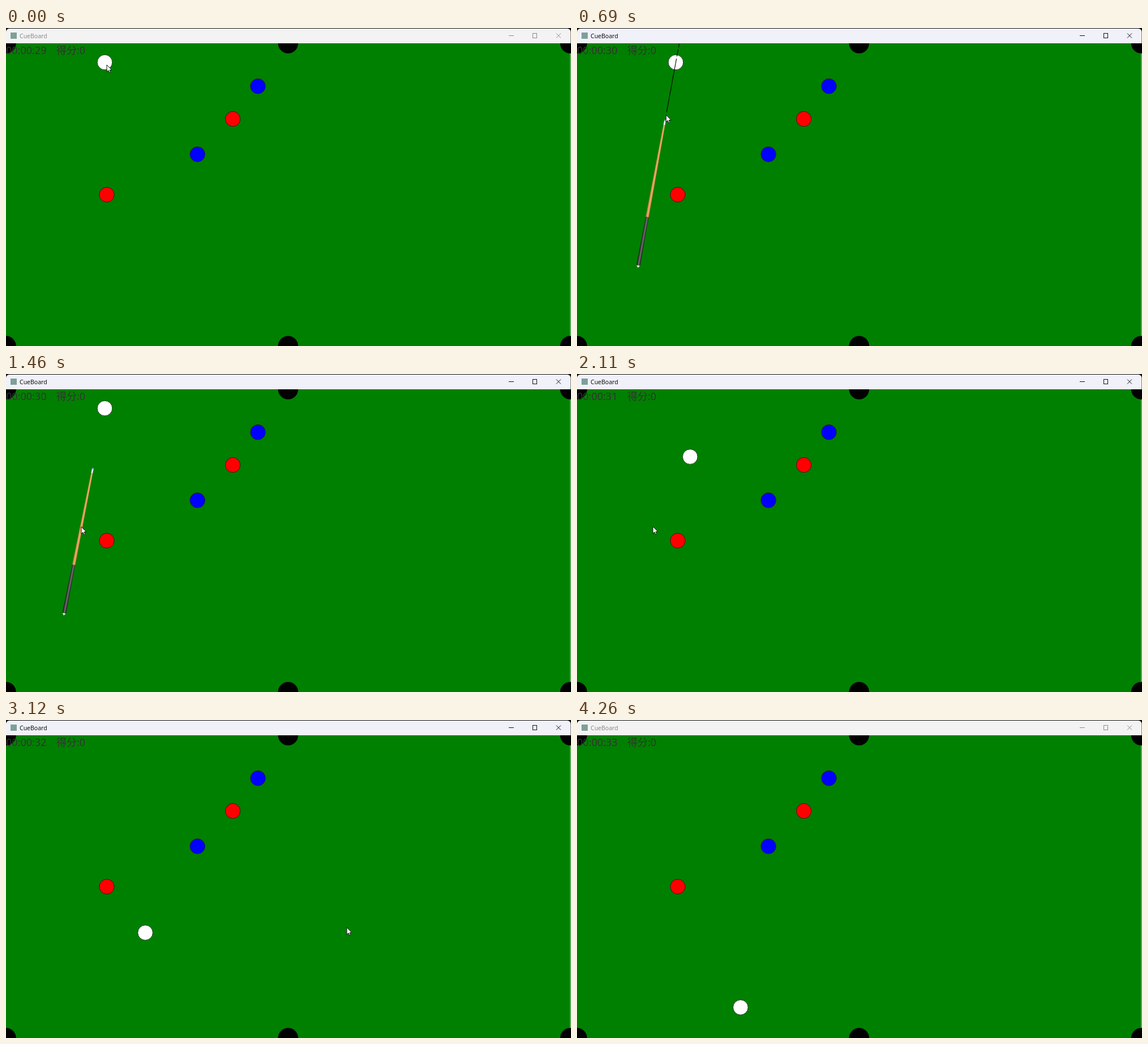
Animation of 998 by 561 pixels, one loop 4.3 s. Source, as an HTML page with a canvas:

```html
<!DOCTYPE html>
<html lang="zh">
<head>
<meta charset="utf-8">
<title>CueBoard</title>
<style>
  html, body { margin: 0; width: 100%; height: 100%; overflow: hidden; background: #008000; }
  canvas { display: block; }
</style>
</head>
<body>
<canvas id="stage" width="998" height="561"></canvas>
<script>
const ctx = document.getElementById('stage').getContext('2d');
const LOOP = 4300, HOLD = 360, STEP = 40.6;
const AIM_START = 400, RELEASE = 1320, HIT = 1585;
const CUE_SPEED = 0.84;

// Paths as [time, x, y], linear between points
const ballPath = [
  [1590, 174.5, 60.5], [1673, 178.5, 41], [2110, 200, 147], [2470, 217, 232],
  [3120, 246, 375], [3810, 273.5, 513], [4035, 280.5, 547.5],
  [4090, 282.3, 539.5], [4260, 289, 506.5], [4300, 290.5, 499]
];
const mousePath = [
  [360, 178, 65], [440, 173, 80], [690, 157, 155], [850, 145, 214],
  [1080, 133, 269.5], [1950, 133, 269.5], [2050, 134, 269], [2920, 134, 269],
  [3000, 262, 283], [3120, 600.5, 365], [3280, 890, 565]
];

function along(path, t) {
  const next = path.findIndex(p => p[0] > t);
  if (next === 0) return path[0].slice(1);
  if (next < 0) return path[path.length - 1].slice(1);
  const [t0, x0, y0] = path[next - 1], [t1, x1, y1] = path[next];
  const k = (t - t0) / (t1 - t0);
  return [x0 + (x1 - x0) * k, y0 + (y1 - y0) * k];
}

function disc(x, y, r, color, edge) {
  ctx.beginPath();
  ctx.arc(x, y, r, 0, 7);
  ctx.fillStyle = color;
  ctx.fill();
  if (edge) {
    ctx.strokeStyle = edge;
    ctx.lineWidth = 1;
    ctx.stroke();
  }
}

function shape(points, fill, stroke) {
  ctx.beginPath();
  points.forEach(([x, y]) => ctx.lineTo(x, y));
  ctx.closePath();
  ctx.fillStyle = fill;
  ctx.fill();
  if (stroke) {
    ctx.strokeStyle = stroke;
    ctx.lineWidth = 1;
    ctx.stroke();
  }
}

function text(str, x, y, size, color) {
  ctx.font = size + 'px "Noto Sans", "Noto Sans CJK SC", "Noto Sans CJK", sans-serif';
  ctx.fillStyle = color;
  ctx.fillText(str, x, y);
}

function titleBar(active) {
  ctx.fillStyle = '#111';
  ctx.fillRect(0, 0, 998, 27);
  ctx.fillStyle = active ? '#f0f1f9' : '#f3f3f3';
  ctx.beginPath();
  ctx.roundRect(0, 1, 997.5, 26, [6, 6, 0, 0]);
  ctx.fill();
  ctx.fillStyle = '#7f9f98';
  ctx.fillRect(8, 8, 11, 11);
  text('CueBoard', 24, 17.5, 10.5, active ? '#111' : '#8b8b8b');

  ctx.strokeStyle = active ? '#111' : '#8b8b8b';
  ctx.lineWidth = 1;
  ctx.strokeRect(930.5, 9.5, 7, 8);
  ctx.beginPath();
  ctx.moveTo(888, 13.5); ctx.lineTo(897, 13.5);
  ctx.moveTo(972, 9.5);  ctx.lineTo(980, 17.5);
  ctx.moveTo(980, 9.5);  ctx.lineTo(972, 17.5);
  ctx.stroke();
}

function table(t) {
  ctx.fillStyle = '#008000';
  ctx.fillRect(0, 27, 998, 534);
  ctx.fillStyle = '#b9cfb9';
  ctx.fillRect(996.5, 27, 1, 534);
  for (const x of [0, 498.3, 996.6])
    for (const y of [27, 561]) disc(x, y, 17.8, '#000');
  const seconds = 29 + Math.floor((t + 370) / 1000);
  text('00:00:' + seconds, 0, 45.5, 18, '#333');
  text('得分:0', 89, 45.5, 18, '#333');
}

function band(edge, middle) {
  const g = ctx.createLinearGradient(0, -3.3, 0, 3.3);
  g.addColorStop(0, edge);
  g.addColorStop(0.45, middle);
  g.addColorStop(1, edge);
  return g;
}

// A tapered piece of the cue between two distances from its tip
function piece(a, b, fill) {
  const half = d => 1.4 + d * 0.0075;
  shape([[a, -half(a)], [b, -half(b)], [b, half(b)], [a, half(a)]], fill);
}

function cue(x, y, angle) {
  ctx.save();
  ctx.translate(x, y);
  ctx.rotate(angle);
  piece(0, 9, '#e8eeee');
  piece(0, 2, '#6fa5b5');
  piece(9, 174, band('#b66b2c', '#f0b06c'));
  piece(174, 261, band('#161616', '#707070'));
  shape([[261, -3], [265, 0], [261, 3]], '#eee');
  ctx.restore();
}

function aimLine(x, y, angle) {
  const dx = -Math.cos(angle), dy = -Math.sin(angle);
  if (dy > -0.2) return;
  const reach = (28 - y) / dy;
  ctx.save();
  ctx.setLineDash([96, 4, 13, 3]);
  ctx.strokeStyle = '#000';
  ctx.lineWidth = 1.1;
  ctx.beginPath();
  ctx.moveTo(x + dx * 5, y + dy * 5);
  ctx.lineTo(x + dx * reach, y + dy * reach);
  ctx.stroke();
  ctx.restore();
}

function pointer(x, y) {
  const arrow = [[0, 0], [0, 12.5], [2.9, 9.8], [4.9, 14], [6.8, 13.1], [5, 9.2], [8.8, 9]];
  shape(arrow.map(([px, py]) => [x + px, y + py]), '#fff', '#111');
}

function draw(t) {
  const ball = along(ballPath, t), mouse = along(mousePath, t);
  const angle = Math.atan2(mouse[1] - ball[1], mouse[0] - ball[0]);

  table(t);
  titleBar(t >= HOLD && t < 3600);
  for (const [x, y, color] of [
    [445, 102.7, '#00f'], [400.6, 160.5, '#f00'],
    [338.2, 222.8, '#00f'], [178, 294, '#f00']
  ]) disc(x, y, 13.3, color, '#222');
  disc(...ball, 13.3, '#fff', '#1c3c1c');

  if (t >= AIM_START && t < HIT) {
    if (t < RELEASE) aimLine(...mouse, angle);
    const gap = 9 - Math.max(0, t - RELEASE) * CUE_SPEED;
    cue(mouse[0] + Math.cos(angle) * gap, mouse[1] + Math.sin(angle) * gap, angle);
  }
  if (t < 3280) pointer(...mouse);
}

function tick(now) {
  const t = now % LOOP;
  // Motion advances in even steps after the opening hold
  draw(t < HOLD ? 0 : HOLD + Math.floor((t - HOLD) / STEP + 0.1) * STEP);
  requestAnimationFrame(tick);
}
draw(0);
requestAnimationFrame(tick);
</script>
</body>
</html>
```
